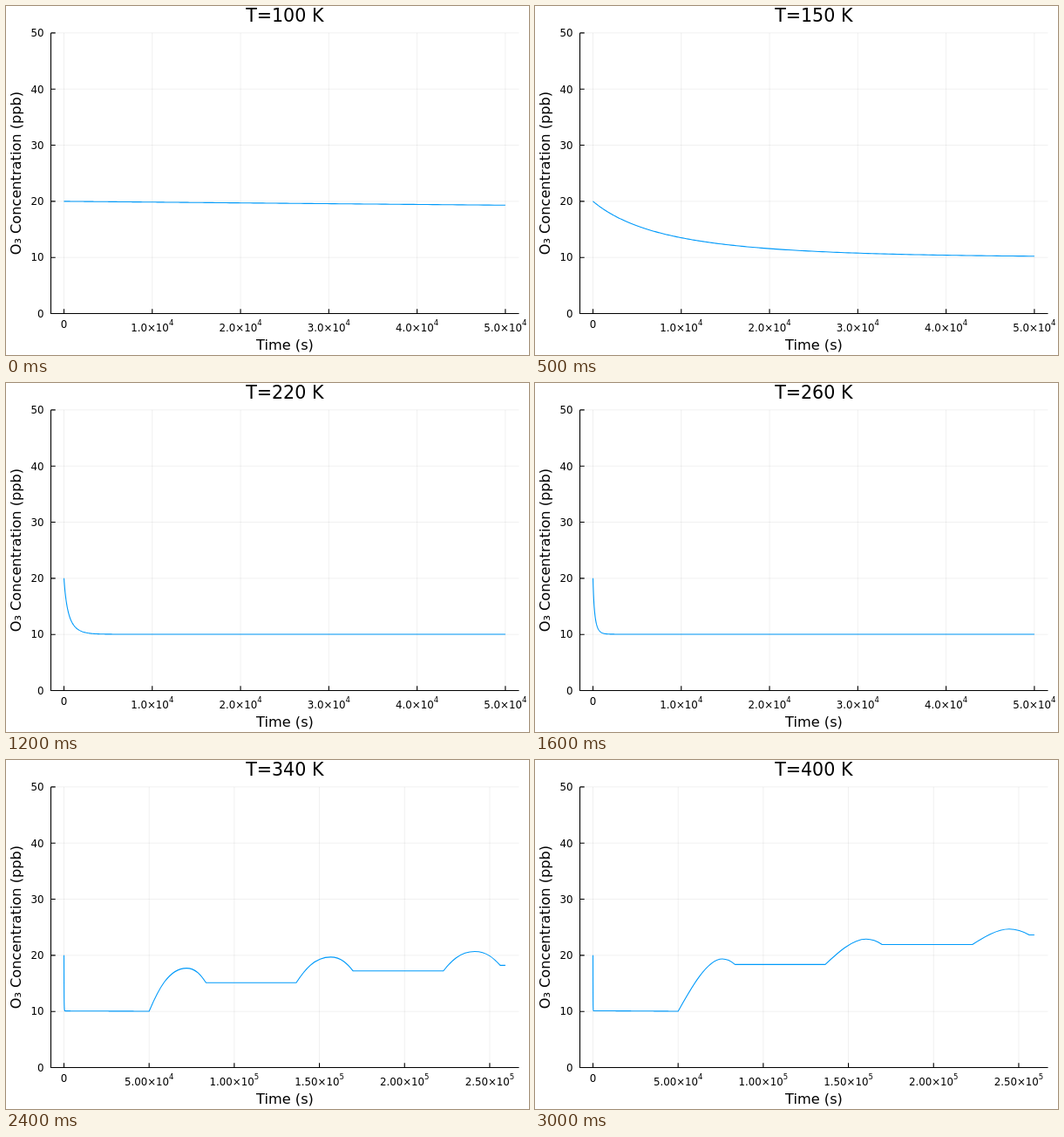
An HTML page for the animation above (3.1 s loop, 600 by 400 pixels).

```html
<!DOCTYPE html>
<html lang="en">
<head>
<meta charset="utf-8">
<title>Ozone concentration by temperature</title>
<style>
  html, body { margin: 0; width: 100%; height: 100%; overflow: hidden; background: #fff; }
  svg { display: block; width: 600px; height: 400px; }
  text { font-family: "DejaVu Sans", sans-serif; fill: #000; text-anchor: middle; }
  .tick { font-size: 11.8px; }
  .label { font-size: 16.2px; }
  .grid { stroke: #000; stroke-opacity: .1; stroke-width: .6; fill: none; }
  .axis { stroke: #000; stroke-width: 1.1; fill: none; }
  .curve { stroke: #009afa; stroke-width: 1.1; stroke-linejoin: round; fill: none; }
</style>
</head>
<body>
<svg viewBox="0 0 600 400">
  <path id="grid" class="grid"/>
  <path id="axis" class="axis"/>
  <g id="yTicks" class="tick"></g>
  <g id="xTicks" class="tick"></g>
  <path id="curve" class="curve"/>
  <text id="title" x="319.8" y="18.4" font-size="20.6"></text>
  <text class="label" x="320" y="393.5">Time (s)</text>
  <text class="label" transform="translate(16.6 191.6) rotate(-90)">O₃ Concentration (ppb)</text>
</svg>
<script>
const STEP = 100, STEPS = 31;
const LEFT = 51.5, RIGHT = 588.5, TOP = 30.9, BASE = 352.5;
const X0 = 66.5, SPAN = 506.4;
const SHORT = 5e4, LONG = 259200, DAY = 86400;
const SUNRISE = 5e4, SUNSET = 83400, LONG_FROM = 300;

const $ = id => document.getElementById(id);
const py = ppb => BASE - ppb * (BASE - TOP) / 50;
const pt = (x, y) => x.toFixed(2) + ' ' + y.toFixed(2);

// Parabola through values at 310, 370 and 400 K
function fit([a, b, c], T) {
  return a * (T - 370) * (T - 400) / 5400
    - b * (T - 310) * (T - 400) / 1800
    + c * (T - 310) * (T - 370) / 2700;
}

// Each day: peak time (s after sunrise), peak ppb, ppb after sunset
const DAYS = [
  { at: [20050, 23900, 25950], peak: [18.04, 18.15, 19.36], end: [14.3, 16.48, 18.37] },
  { at: [18700, 22000, 24000], peak: [19.56, 20.8, 22.9], end: [16.05, 19.17, 21.92] },
  { at: [17750, 19700, 21600], peak: [20.24, 22.16, 24.69], end: [16.87, 20.46, 23.63] }
];

// Second-order titration of 20 ppb ozone by 10 ppb NO
function decay(T, t) {
  const rate = 0.534 * Math.exp(-1350 / T);
  return 10 / (1 - 0.5 * Math.exp(-rate * t));
}

function nightCurve(T, px) {
  const warm = Math.max(0, (T - 250) / 120), n = 240, out = [];
  for (let i = 0; i <= n; i++) {
    const t = SHORT * (i / n) ** 3;
    const rest = 0.03 + 0.07 * warm * (1 - t / SHORT);
    const ppb = decay(T, t);
    out.push(pt(px(t), py(ppb + rest * (20 - ppb) / 10)));
  }
  return 'M' + out.join('L');
}

function dayCurves(T, px) {
  const w = (T - 310) / 90;
  const a = 0.2 + 0.09 * w, b = 0.49 - 0.05 * w, c = 0.55 - 0.21 * w;
  let d = '', from = 10.03;
  DAYS.forEach((day, i) => {
    const dawn = SUNRISE + i * DAY;
    const x0 = px(dawn), x1 = px(dawn + fit(day.at, T)), x2 = px(SUNSET + i * DAY);
    const y0 = py(from), y1 = py(fit(day.peak, T));
    from = fit(day.end, T);
    const y2 = py(from), rise = x1 - x0, fall = x2 - x1;
    d += 'L' + pt(x0, y0)
      + 'C' + pt(x0 + a * rise, y0 + b * (y1 - y0)) + ' ' + pt(x1 - c * rise, y1) + ' ' + pt(x1, y1)
      + 'C' + pt(x1 + 0.48 * fall, y1) + ' ' + pt(x2 - 0.24 * fall, y2 + 0.48 * (y1 - y2)) + ' ' + pt(x2, y2);
  });
  return d + 'L' + pt(px(LONG), py(from));
}

function xTickLabel(x, value, digits) {
  if (!value) return `<text x="${x}" y="368.7">0</text>`;
  const power = Math.floor(Math.log10(value) + 1e-9);
  const mantissa = (value / 10 ** power).toFixed(digits);
  return `<text x="${x}" y="372.6">${mantissa}×10<tspan dy="-6.2" font-size="8.5">${power}</tspan></text>`;
}

function drawAxes(long) {
  const end = long ? LONG : SHORT, gap = long ? 5e4 : 1e4;
  let grid = '', axis = `M${LEFT} ${TOP}V${BASE}H${RIGHT}`, xs = '', ys = '';
  for (let i = 0; i <= 5; i++) {
    const x = +(X0 + SPAN * i * gap / end).toFixed(2), y = +py(i * 10).toFixed(2);
    grid += `M${x} ${TOP}V${BASE}M${LEFT} ${y}H${RIGHT}`;
    axis += `M${x} ${BASE}v-5.2M${LEFT} ${y}h5.2`;
    xs += xTickLabel(x, i * gap, long ? 2 : 1);
    ys += `<text x="43.6" y="${y + 4.3}" style="text-anchor:end">${i * 10}</text>`;
  }
  $('grid').setAttribute('d', grid);
  $('axis').setAttribute('d', axis);
  $('xTicks').innerHTML = xs;
  $('yTicks').innerHTML = ys;
}

let shown = -1, wasLong = null;
function draw(ms) {
  const step = Math.floor(ms / STEP) % STEPS;
  if (step === shown) return;
  shown = step;
  const T = 100 + 10 * step, long = T >= LONG_FROM;
  if (long !== wasLong) drawAxes(wasLong = long);
  const px = t => X0 + SPAN * t / (long ? LONG : SHORT);
  $('curve').setAttribute('d', nightCurve(T, px) + (long ? dayCurves(T, px) : ''));
  $('title').textContent = `T=${T} K`;
}

const start = performance.now();
function loop() {
  draw(performance.now() - start);
  requestAnimationFrame(loop);
}
loop();
</script>
</body>
</html>
```
